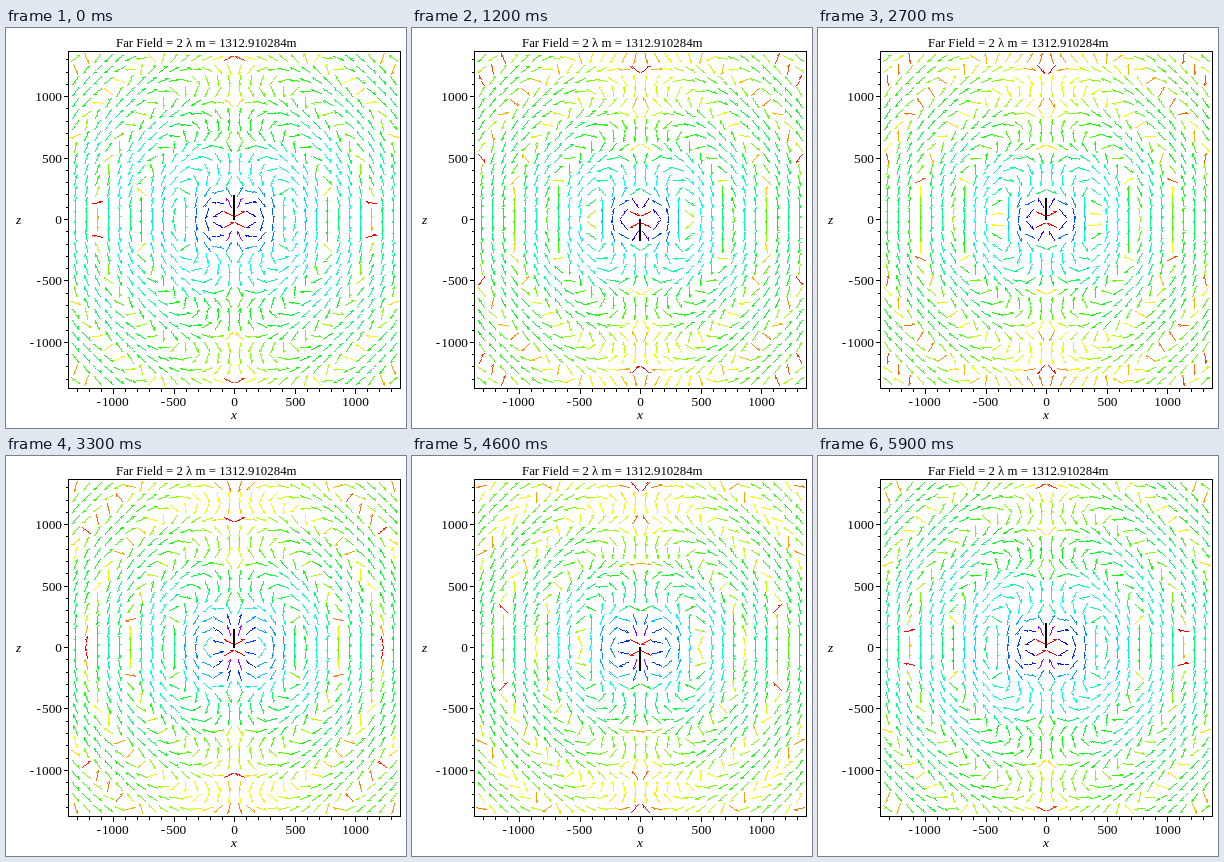
Recreate the animation shown at these times as an HTML page with a canvas. Size 400 by 400 pixels, loop 6 s.

```html
<!DOCTYPE html>
<html lang="en">
<head>
<meta charset="utf-8">
<title>Dipole field</title>
<style>
  html, body { margin: 0; width: 100%; height: 100%; overflow: hidden; background: #fff; }
  canvas, svg { position: absolute; left: 0; top: 0; width: 400px; height: 400px; }
  text { font: 13.33px "Liberation Serif", "Times New Roman", serif; fill: #000; }
  .title { font-size: 12.85px; }
  .mid { text-anchor: middle; }
  .end { text-anchor: end; }
  .var { font-style: italic; text-anchor: middle; }
  path { stroke: #000; fill: none; shape-rendering: crispEdges; }
</style>
</head>
<body>
<canvas id="field" width="400" height="400"></canvas>
<svg id="axes" viewBox="0 0 400 400">
  <text class="title" x="110" y="19">Far Field = 2 λ m = 1312.910284m</text>
  <text class="var" x="228" y="391">x</text>
  <text class="var" x="12.5" y="196">z</text>
</svg>
<script>
const RANGE = 1312.910284;          // two wavelengths
const K = 4 * Math.PI / RANGE;      // wave number
const N = 30, STEP = 2 * RANGE / (N - 1);
const CX = 228.5, CY = 191.5, SX = 0.121, SY = 0.1228;
const BOX = { l: 62.5, r: 394.5, t: 23.5, b: 360.5 };
const FRAMES = 60, FRAME_MS = 100, CYCLES = 2;
const DIPOLE = 200, ARROW = 0.95 * STEP;

const ctx = document.getElementById('field').getContext('2d');
const svg = document.getElementById('axes');
const px = x => CX + x * SX;
const py = z => CY - z * SY;

function add(name, attrs, text = '') {
  const el = document.createElementNS('http://www.w3.org/2000/svg', name);
  for (const key in attrs) el.setAttribute(key, attrs[key]);
  el.textContent = text;
  svg.appendChild(el);
}

function drawAxes() {
  let d = `M${BOX.l} ${BOX.t}H${BOX.r}V${BOX.b}H${BOX.l}Z`;
  for (let v = -1300; v <= 1300; v += 100) {
    const major = v % 500 === 0, len = major ? 5 : 3;
    const x = Math.floor(px(v)) + 0.5, y = Math.floor(py(v)) + 0.5;
    d += `M${x} ${BOX.b}v${len}M${BOX.l} ${y}h${-len}`;
    if (major) {
      const label = String(v).replace('-', '-\u200a');
      add('text', { class: 'mid', x: x - (v < 0 ? 1 : 0), y: 378 }, label);
      add('text', { class: 'end', x: 56, y: y + 4.5 }, label);
    }
  }
  add('path', { d });
}

// Radiating point dipole along z, including the near field
function fieldAt(x, z, phase) {
  const r = Math.hypot(x, z), u = K * r;
  const s = x / r, c = z / r, f = u - phase;
  const near = Math.cos(f) / u ** 3 + Math.sin(f) / u ** 2;
  const er = 2 * c * near;
  const et = s * (near - Math.cos(f) / u);
  const ex = er * s + et * c, ez = er * c - et * s;
  const mag = Math.hypot(ex, ez);
  return { x, z, dx: ex / mag, dz: ez / mag, level: Math.log(mag) };
}

// Hard-edged one pixel line
function line(x0, y0, x1, y1) {
  const n = Math.max(1, Math.round(Math.max(Math.abs(x1 - x0), Math.abs(y1 - y0))));
  for (let i = 0; i <= n; i++) {
    ctx.fillRect(Math.floor(x0 + (x1 - x0) * i / n), Math.floor(y0 + (y1 - y0) * i / n), 1, 1);
  }
}

// Harpoon: a shaft with a single barb
function drawArrow({ x, z, dx, dz }) {
  const at = (along, across) => [
    px(x + ARROW * (along * dx - across * dz)),
    py(z + ARROW * (along * dz + across * dx))
  ];
  const tip = at(0.5, 0);
  line(...at(-0.5, 0), ...tip);
  line(...at(0.25, 0.1), ...tip);
}

function draw(frame) {
  const phase = 2 * Math.PI * CYCLES * frame / (FRAMES - 1);
  const arrows = [];
  for (let i = 0; i < N; i++) {
    for (let j = 0; j < N; j++) {
      arrows.push(fieldAt(i * STEP - RANGE, j * STEP - RANGE, phase));
    }
  }
  const levels = arrows.map(a => a.level);
  const min = Math.min(...levels), max = Math.max(...levels);

  ctx.clearRect(0, 0, 400, 400);
  for (const a of arrows) {
    ctx.fillStyle = `hsl(${360 * (a.level - min) / (max - min)}, 100%, 50%)`;
    drawArrow(a);
  }

  const end = Math.round(py(DIPOLE * Math.cos(phase))), mid = Math.floor(CY);
  ctx.fillStyle = '#000';
  ctx.fillRect(227, Math.min(end, mid), 2, Math.abs(end - mid) + 1);
}

const start = performance.now();
let shown = -1;
function tick() {
  const frame = Math.floor((performance.now() - start) / FRAME_MS) % FRAMES;
  if (frame !== shown) draw(shown = frame);
  requestAnimationFrame(tick);
}
drawAxes();
tick();
</script>
</body>
</html>
```
